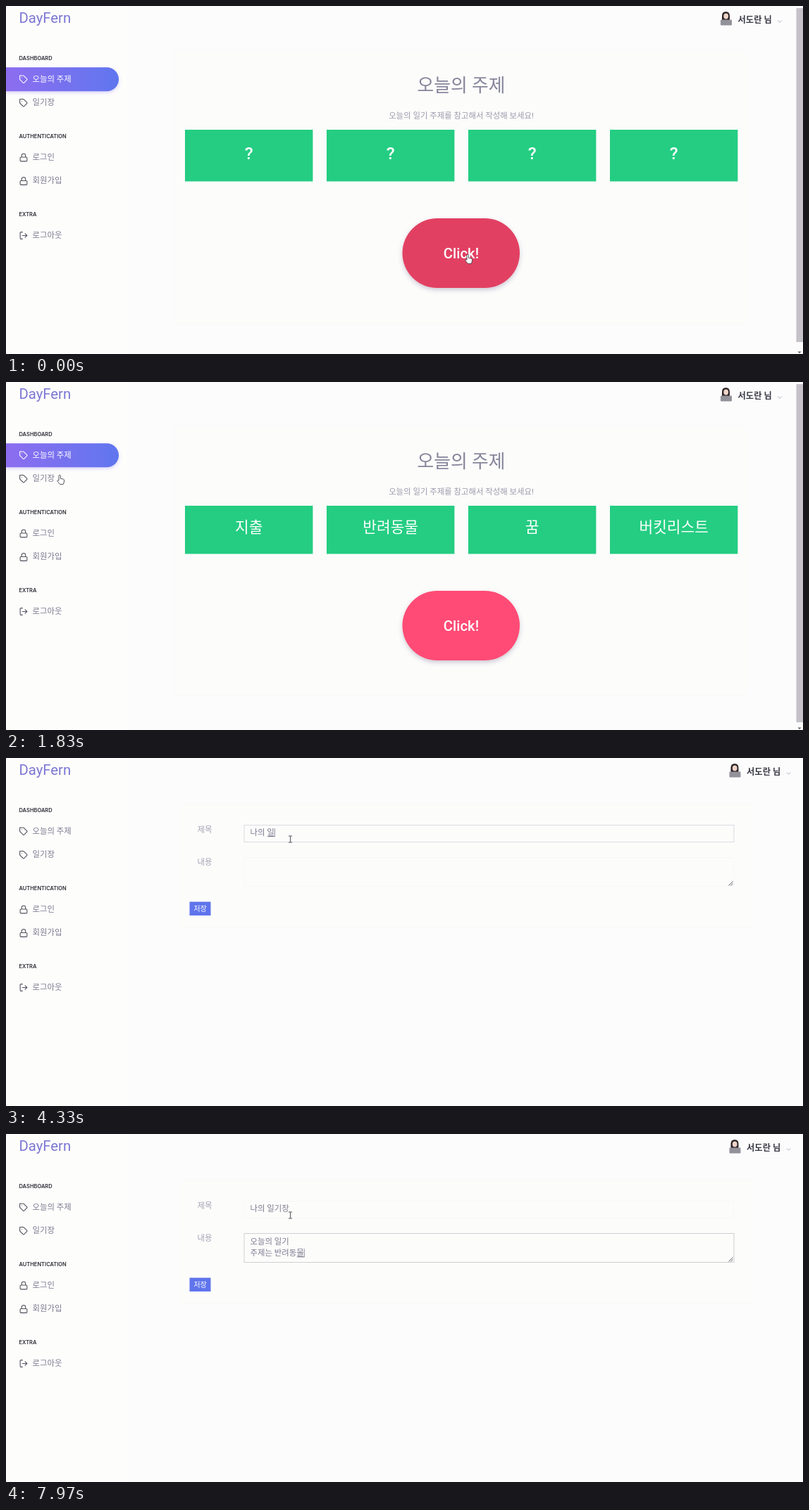
Recreate the animation shown at these times as an HTML page. Size 1131 by 495 pixels, loop 8000 ms.

```html
<!DOCTYPE html>
<html lang="ko">
<head>
<meta charset="utf-8">
<title>Diary</title>
<style>
html, body { margin: 0; width: 100%; height: 100%; overflow: hidden; background: #fdfcfd; }
svg { display: block; position: absolute; left: 0; top: 0; }
text { font: 11.4px Roboto, 'Noto Sans CJK KR', 'Noto Sans CJK', sans-serif; fill: #7c7b90; white-space: pre; }
text.cap { font: 600 7.5px Inter, sans-serif; fill: #2c2c36; }
text.logo { font-size: 20.3px; fill: #7b76d2; }
text.user { font-size: 12.3px; font-weight: 600; fill: #3c3c48; }
text.title { font-size: 25.8px; fill: #85849a; }
text.hint { fill: #9c9bac; }
text.word { font-size: 21.4px; fill: #fff; }
text.mark { font-size: 24.5px; font-weight: 500; fill: #fff; }
text.click { font-size: 20.3px; font-weight: 500; fill: #fff; }
text.small { font-size: 10.2px; fill: #fff; }
text.head { fill: #a3a2b3; }
text.cell { fill: #928dac; }
text.num { font-size: 11.5px; font-weight: 500; fill: #918da9; }
text.mid { text-anchor: middle; }
.icon { fill: none; stroke-width: 2; stroke-linecap: round; stroke-linejoin: round; }
.panel { fill: #fcfcfb; stroke: #faf9fb; }
.field { fill: none; }
.action { fill: #5f74ec; }
</style>
</head>
<body>
<svg id="stage" width="1131" height="495" viewBox="0 0 1131 495">
  <defs>
    <linearGradient id="violet"><stop stop-color="#8d6df0"/><stop offset="1" stop-color="#6076ee"/></linearGradient>
    <filter id="soft" x="-20%" y="-20%" width="140%" height="160%">
      <feDropShadow dx="0" dy="3" stdDeviation="3" flood-color="#50406e" flood-opacity=".28"/>
    </filter>
    <filter id="glow" x="-10%" y="-30%" width="120%" height="180%">
      <feDropShadow dx="0" dy="2" stdDeviation="2.5" flood-color="#7a5ff0" flood-opacity=".28"/>
    </filter>
  </defs>
  <rect width="1131" height="495" fill="#fdfcfd"/>
  <rect width="172" height="495" fill="#fdfdfc"/>
  <text class="logo" x="18.5" y="24">DayFern</text>
  <path id="pill" d="M0 0H143a17 17 0 0 1 0 34H0z" fill="url(#violet)" filter="url(#glow)"/>
  <g id="menu"></g>

  <g id="user">
    <path d="M1016 20V14q0-6 5.500-6t5.500 6v6z" fill="#2d2528"/>
    <ellipse cx="1021.700" cy="14.600" rx="3.400" ry="4" fill="#f0d3c8"/>
    <path d="M1014.500 27q0-7 7-7t7.500 7z" fill="#7a6f7c"/>
    <rect x="1014" y="19.500" width="16" height="8" rx="1" fill="#93929b"/>
    <text class="user" x="1038.500" y="24">서도란 님</text>
    <path d="M1095 20.500l3 2.800 3-2.800" fill="none" stroke="#b5b4c2"/>
  </g>

  <g id="topics">
    <rect id="board" class="panel" x="238.500" y="61.500" width="816" rx="3"/>
    <text class="title mid" x="646" y="122">오늘의 주제</text>
    <text class="hint mid" x="646" y="160">오늘의 일기 주제를 참고해서 작성해 보세요!</text>
    <g id="cards"></g>
    <g id="button">
      <rect id="face" x="562.500" y="297" width="166.500" height="99" rx="49.500" filter="url(#soft)"/>
      <text class="click mid" x="646" y="354">Click!</text>
    </g>
    <rect id="thumb" x="1121.500" y="3" width="9.500" fill="#c4c1c8"/>
    <path d="M1123.500 491.500h5l-2.500 2.500z" fill="#55555c"/>
  </g>

  <g id="list">
    <rect class="panel" x="245.500" y="65.500" width="815" height="143" rx="3"/>
    <rect x="260" y="121.500" width="784" height="38" fill="#f7f5fb"/>
    <text class="head" x="271.500" y="105.800">번호</text>
    <text class="head" x="338" y="105.800">제목</text>
    <text class="head" x="874.500" y="105.800">등록자</text>
    <text class="head" x="974.500" y="105.800">등록일</text>
    <text class="num" x="271.500" y="143.800">3</text>
    <text class="cell" x="338" y="143.500">테스트</text>
    <text class="cell" x="874.500" y="143.500">서도란</text>
    <text class="num" x="974" y="143.800">2024-01-29</text>
    <rect class="action" x="260.500" y="170" width="39.500" height="20"/>
    <text class="small mid" x="280" y="183.600">글쓰기</text>
  </g>

  <g id="form">
    <rect class="panel" x="245.500" y="65.500" width="815" height="176" rx="3"/>
    <text class="head" x="271.500" y="105.600">제목</text>
    <text class="head" x="271.500" y="152">내용</text>
    <rect id="titleBox" class="field" x="338" y="95.500" width="695" height="24"/>
    <rect id="bodyBox" class="field" x="338" y="141.500" width="695" height="41"/>
    <path d="M1025.500 181.500l6-6M1028.500 181.500l3-3" stroke="#5a5a62"/>
    <text id="row0" x="346.500" y="109.600"></text>
    <text id="row1" x="346.500" y="157.300"></text>
    <text id="row2" x="346.500" y="172.800"></text>
    <path id="under" stroke="#77768a"/>
    <path id="caret" stroke="#8a8a98"/>
    <rect class="action" x="260.500" y="204.500" width="30" height="19.500"/>
    <text class="small mid" x="275.500" y="217.600">저장</text>
  </g>

  <g id="pointer">
    <path id="hand" transform="translate(-4 0)" d="M3 8V1.500a1.200 1.200 0 0 1 2.400 0V5.300l4 .9q1.300.4 1.200 1.700L10.200 11l-1 2.500H4.600L1 9.300q-.5-1.300.7-1.500z" fill="#fff" stroke="#44444c" stroke-width=".9"/>
    <path id="arrow" d="M0 0V10l2.300-2 1.500 3.300 1.500-.7L3.900 7.400H7z" fill="#fff" stroke="#44444c" stroke-width=".9"/>
    <path id="beam" d="M-2.500-4.500H2.500M-2.500 4.500H2.500M0-4.500V4.500" fill="none" stroke="#55555c"/>
  </g>
</svg>
<script>
const LOOP = 8000;
const REVEAL = 500, LIST_AT = 2130, FORM_AT = 2860, FOCUS_AT = 3300;
const TITLE_AT = 3600, BODY_FOCUS = 5000, BODY_AT = 5170, KEY = 84;

const $ = id => document.getElementById(id);
const set = (el, attrs) => { for (const k in attrs) el.setAttribute(k, attrs[k]); };
const show = (el, on) => { el.style.display = on ? '' : 'none'; };
function add(parent, tag, attrs, text = '') {
  const el = document.createElementNS('http://www.w3.org/2000/svg', tag);
  set(el, attrs);
  el.textContent = text;
  return parent.appendChild(el);
}

// Sidebar
const ICONS = {
  tag: 'M20.600 13.400l-7.200 7.200a2 2 0 0 1-2.800 0L2 12V2h10l8.600 8.600a2 2 0 0 1 0 2.800zM7 7h.01',
  lock: 'M5 11h14a2 2 0 0 1 2 2v7a2 2 0 0 1-2 2H5a2 2 0 0 1-2-2v-7a2 2 0 0 1 2-2zM7 11V7a5 5 0 0 1 10 0v4',
  exit: 'M9 21H5a2 2 0 0 1-2-2V5a2 2 0 0 1 2-2h4M16 17l5-5-5-5M21 12H9'
};
const menu = $('menu');
[['DASHBOARD', 76.7], ['AUTHENTICATION', 187.7], ['EXTRA', 298.7]]
  .forEach(([name, y]) => add(menu, 'text', { class: 'cap', x: 18.5, y }, name));
const items = [
  ['tag', '오늘의 주제', 104], ['tag', '일기장', 137.5], ['lock', '로그인', 215],
  ['lock', '회원가입', 248.5], ['exit', '로그아웃', 326]
].map(([icon, name, y]) => ({
  icon: add(menu, 'path', { class: 'icon', d: ICONS[icon], transform: `translate(18.500 ${y - 6}) scale(.54)` }),
  label: add(menu, 'text', { x: 37.5, y: y + 3.7 }, name)
}));

// Topic cards
const cards = ['지출', '반려동물', '꿈', '버킷리스트'].map((word, i) => {
  const x = 254 + 201 * i, mid = x + 90.7;
  return {
    box: add($('cards'), 'rect', { x, y: 176, width: 181.4, fill: '#24cd82' }),
    mark: add($('cards'), 'text', { class: 'mark mid', x: mid, y: 218 }, '?'),
    word: add($('cards'), 'text', { class: 'word mid', x: mid, y: 214 }, word)
  };
});

// Hangul input: every state the text passes through, one per key
const CHO = 'ㄱㄲㄴㄷㄸㄹㅁㅂㅃㅅㅆㅇㅈㅉㅊㅋㅌㅍㅎ';
const JONG = ' ㄱㄲㄳㄴㄵㄶㄷㄹㄺㄻㄼㄽㄾㄿㅀㅁㅂㅄㅅㅆㅇㅈㅊㅋㅌㅍㅎ';
const EU = 18, UI = 19;
const join = (c, v, f = 0) => String.fromCharCode(0xac00 + (c * 21 + v) * 28 + f);
function split(ch) {
  const n = ch.charCodeAt(0) - 0xac00;
  return n < 0 ? null : [Math.floor(n / 588), Math.floor(n / 28) % 21, n % 28];
}
function keyStates(text) {
  const states = [{ text: '', composing: false }];
  let done = '', prev = null;
  const push = (s, composing = true) => states.push({ text: s, composing });
  for (const ch of text) {
    const parts = split(ch);
    if (!parts) push(done + ch, false);
    else {
      const [c, v, f] = parts, lead = CHO[c];
      // a new consonant first attaches below the previous syllable
      let tail = 0;
      if (prev && !prev[2]) tail = JONG.indexOf(lead);
      else if (prev && JONG[prev[2]] === 'ㄹ' && lead === 'ㄱ') tail = JONG.indexOf('ㄺ');
      push(tail > 0 ? done.slice(0, -1) + join(prev[0], prev[1], tail) : done + lead);
      if (v === UI) push(done + join(c, EU));
      push(done + join(c, v));
      if (f) push(done + ch);
    }
    done += ch;
    prev = parts;
  }
  return states;
}
const titleKeys = keyStates('나의 일기장');
const bodyKeys = keyStates('오늘의 일기\n주제는 반려동물');
const typed = (keys, start, t) =>
  keys[Math.max(0, Math.min(keys.length - 1, Math.floor((t - start) / KEY) + 1))];

// Pointer path: time, x, y
const PATH = [
  [0, 655, 353], [600, 655, 353], [950, 658, 353], [1180, 658, 353], [1780, 76, 132],
  [2140, 76, 132], [2440, 307, 191], [2500, 307, 191], [2660, 288, 179],
  [2880, 288, 179], [3220, 403.5, 115.5], [LOOP, 403.5, 115.5]
];
function pointerAt(t) {
  const i = PATH.findIndex(p => p[0] > t);
  const a = PATH[i - 1], b = PATH[i];
  const u = (t - a[0]) / (b[0] - a[0]), e = u * u * (3 - 2 * u);
  return [a[1] + (b[1] - a[1]) * e, a[2] + (b[2] - a[2]) * e];
}
const HOT = {
  topics: [[563, 297, 729, 400]],
  list: [[260, 170, 300, 190]],
  form: [[260, 204, 290, 224]]
};
const MENU_HOT = [0, 87, 160, 155];
const FIELDS = [[338, 95, 1033, 120], [338, 141, 1033, 183]];

function drawPointer(t, page) {
  const [x, y] = pointerAt(t);
  const over = ([l, top, r, b]) => x >= l && x <= r && y >= top && y <= b;
  let kind = 'arrow';
  if ([MENU_HOT, ...HOT[page]].some(over)) kind = 'hand';
  else if (page === 'form' && FIELDS.some(over)) kind = 'beam';
  for (const k of ['hand', 'arrow', 'beam']) show($(k), k === kind);
  set($('pointer'), { transform: `translate(${x} ${y})` });
}

function drawTopics(t) {
  const open = t >= REVEAL;
  cards.forEach(c => {
    set(c.box, { height: open ? 68.5 : 73.5 });
    show(c.mark, !open);
    show(c.word, open);
  });
  set($('board'), { height: open ? 384.5 : 390 });
  set($('thumb'), { height: open ? 481 : 475 });
  set($('button'), { transform: `translate(0 ${open ? 0 : 5})` });
  const u = Math.max(0, Math.min(1, (t - 1320) / 150));
  const mix = (a, b) => Math.round(a + (b - a) * u);
  set($('face'), { fill: `rgb(${mix(226, 255)},${mix(64, 76)},${mix(98, 116)})` });
}

function drawForm(t) {
  const inBody = t >= BODY_FOCUS, focused = t >= FOCUS_AT;
  const title = typed(titleKeys, TITLE_AT, t), body = typed(bodyKeys, BODY_AT, t);
  const lines = body.text.split('\n');
  [title.text, lines[0], lines[1] || ''].forEach((s, i) => { $('row' + i).textContent = s; });
  set($('titleBox'), { stroke: focused && !inBody ? '#dcdce4' : '#f7f7f9' });
  set($('bodyBox'), { stroke: inBody ? '#d0d0d4' : '#f7f7f9' });

  const row = $('row' + (inBody ? lines.length : 0));
  const state = inBody ? body : title;
  const composing = state.composing && (inBody || t < BODY_FOCUS - 100);
  const len = row.textContent.length;
  const width = len ? row.getComputedTextLength() : 0;
  const end = 347 + width, base = +row.getAttribute('y');
  const typing = inBody ? t >= BODY_AT : t >= TITLE_AT && t < TITLE_AT + KEY * titleKeys.length;
  const blink = (t - (inBody ? BODY_FOCUS : FOCUS_AT)) % 1000 < 500;
  show($('caret'), focused && (typing || blink));
  set($('caret'), { d: `M${end} ${base - 9.5}V${base + 2.5}` });
  show($('under'), composing);
  if (composing) {
    const from = end - row.getSubStringLength(len - 1, 1);
    set($('under'), { d: `M${from} ${base + 2}H${end}` });
  }
}

function draw(t) {
  const page = t < LIST_AT ? 'topics' : t < FORM_AT ? 'list' : 'form';
  for (const p of ['topics', 'list', 'form']) show($(p), p === page);
  const active = { topics: 0, list: 1, form: -1 }[page];
  show($('pill'), active >= 0);
  set($('pill'), { transform: `translate(0 ${active === 1 ? 121 : 87.3})` });
  items.forEach((it, i) => {
    it.icon.style.stroke = i === active ? '#fff' : '#50505c';
    it.label.style.fill = i === active ? '#fff' : '';
  });
  set($('user'), { transform: `translate(${page === 'topics' ? 0 : 12.5} 0)` });
  if (page === 'topics') drawTopics(t);
  if (page === 'form') drawForm(t);
  drawPointer(t, page);
}

const start = performance.now();
function tick() {
  draw((performance.now() - start) % LOOP);
  requestAnimationFrame(tick);
}
tick();
</script>
</body>
</html>
```
